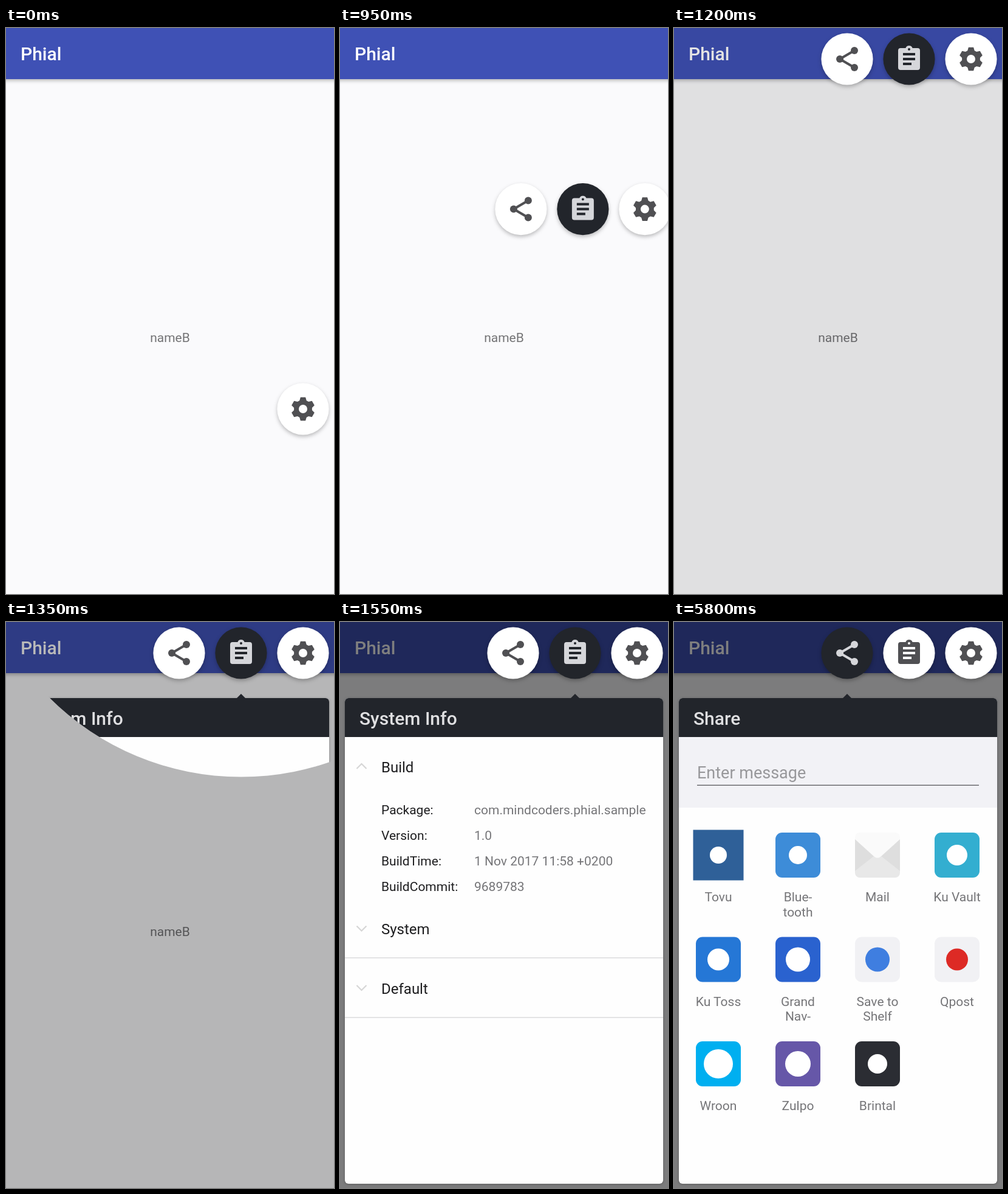
An HTML page that plays this animation: 540 px wide and 930 px high, repeating every 8 s.

```html
<!DOCTYPE html>
<html lang="en">
<head>
<meta charset="utf-8">
<title>Phial</title>
<style>
  html, body { margin: 0; width: 100%; height: 100%; overflow: hidden; background: #fafafc; }
  svg { display: block; font-family: Roboto, sans-serif; }
  .bar { filter: drop-shadow(0 2px 3px rgba(0,0,0,.3)); }
  .disc { filter: drop-shadow(0 3px 3px rgba(0,0,0,.25)); }
  .panel { filter: drop-shadow(0 1px 2px rgba(0,0,0,.25)); }
</style>
</head>
<body>
<svg id="stage" width="540" height="930" viewBox="0 0 540 930"></svg>
<script>
const LOOP = 8000, STEP = 50;
const DARK = '#22252b', LIGHT = '#d5d6da', GREY = '#505053', MUTED = '#757578';
const SLOTS = [285, 387, 489], TOP = 51, HOME = 626;
const REVEAL_Y = -193, REVEAL_R = 1190;

const text = (x, y, size, fill, str, more = '') =>
  `<text x="${x}" y="${y}" font-size="${size}" fill="${fill}" ${more}>${str}</text>`;
const rect = (x, y, w, h, fill, r = 0) =>
  `<rect x="${x}" y="${y}" width="${w}" height="${h}" rx="${r}" fill="${fill}"/>`;
const circle = (x, y, r, fill) => `<circle cx="${x}" cy="${y}" r="${r}" fill="${fill}"/>`;

// Icons are drawn around 0,0 in 24-unit space
function gearPath() {
  const points = [];
  for (let k = 0; k < 6; k++)
    for (const [a, r] of [[-22.5, 7.5], [-12, 9.9], [12, 9.9], [22.5, 7.5]]) {
      const angle = (k * 60 + a) * Math.PI / 180;
      points.push((r * Math.sin(angle)).toFixed(2) + ' ' + (-r * Math.cos(angle)).toFixed(2));
    }
  const hole = 'M3.5 0A3.5 3.5 0 1 0 -3.5 0A3.5 3.5 0 1 0 3.5 0Z';
  return `<path fill="currentColor" fill-rule="evenodd" d="M${points.join('L')}Z${hole}"/>`;
}
const icons = [
  `<path d="M6 -7L-6 0L6 7" fill="none" stroke="currentColor" stroke-width="2"/>` +
    [[6, -7], [-6, 0], [6, 7]].map(([x, y]) => circle(x, y, 3, 'currentColor')).join(''),
  `<path fill="currentColor" fill-rule="evenodd" d="M7 -9H2.82a3 3 0 0 0-5.64 0H-7a2 2 0 0 0-2 2V7
    a2 2 0 0 0 2 2H7a2 2 0 0 0 2-2V-7a2 2 0 0 0-2-2zM0 -9a1 1 0 0 1 0 2a1 1 0 0 1 0-2z
    M2 5H-5V3H2zM5 1H-5V-1H5zM5 -3H-5V-5H5z"/>`,
  gearPath()
];
const button = i => `<g id="b${i}"><circle class="disc" r="42.6"/><g transform="scale(2)">${icons[i]}</g></g>`;

const panel = (id, tip, title, body) => `
  <clipPath id="${id}Clip"><circle id="${id}Hole" cx="${tip}" cy="${REVEAL_Y}"/></clipPath>
  <g id="${id}" clip-path="url(#${id}Clip)">
    <g class="panel">${rect(8, 125, 524, 798, '#fefefe', 6)}</g>
    <path d="M8 189V131a6 6 0 0 1 6-6H526a6 6 0 0 1 6 6V189Z" fill="${DARK}"/>
    <path id="${id}Tip" d="M${tip - 8} 126l8 -8l8 8z" fill="${DARK}"/>
    ${text(32, 168.5, 30, '#dfdfe1', title, 'font-weight="500"')}
    ${body}
  </g>`;

function infoBody() {
  const section = (y, name, dir) =>
    `<path d="M27.5 ${y - 1 + 4 * dir}l8 ${-8 * dir}l8 ${8 * dir}" fill="none" stroke="#d6d6d6" stroke-width="2.2"/>` +
    text(68, y + 8.5, 24, '#1e1e20', name);
  const rows = [
    ['Package:', 'com.mindcoders.phial.sample'], ['Version:', '1.0'],
    ['BuildTime:', '1 Nov 2017 11:58 +0200'], ['BuildCommit:', '9689783']
  ].map(([key, value], i) =>
    text(68, 316 + i * 42, 21, '#1e1e20', key) + text(221, 316 + i * 42, 21, MUTED, value));
  return section(238, 'Build', 1) + rows.join('') +
    section(504.5, 'System', -1) + section(602, 'Default', -1) +
    rect(8, 551, 524, 1.5, '#dcdcde') + rect(8, 649, 524, 1.5, '#dcdcde');
}

function shareBody() {
  // tile colour, inner disc colour, disc radius, label lines
  const apps = [
    ['#2f6098', '#fff', 14, 'Tovu'],
    ['#3d8cd8', '#fff', 15, 'Blue-', 'tooth'],
    ['#dedede', '', 0, 'Mail'],
    ['#33aed0', '#fff', 17, 'Ku Vault'],
    ['#2577d6', '#fff', 18, 'Ku Toss'],
    ['#2a62cf', '#fff', 20, 'Grand', 'Nav-'],
    ['#f1f1f4', '#3f7ee0', 20, 'Save to', 'Shelf'],
    ['#f1f1f4', '#dd2a25', 18, 'Qpost'],
    ['#00aff0', '#fff', 24, 'Wroon'],
    ['#6657a8', '#fff', 21, 'Zulpo'],
    ['#2b2d33', '#fff', 16, 'Brintal']
  ];
  const envelope = `<path d="M298 409L335 380L372 409V412a8 8 0 0 1-8 8H306a8 8 0 0 1-8-8z" fill="#e8e8e8"/>
    <path d="M298 354a8 8 0 0 1 8-8H364a8 8 0 0 1 8 8V357L341 385q-6 5-12 0L298 357z" fill="#fafafa"/>`;
  return rect(8, 189, 524, 116, '#f2f2f6') +
    text(38, 257, 27, '#98989b', 'Enter message') + rect(38, 267.5, 464, 1.5, '#6c6c70') +
    apps.map(([tile, mark, r, ...lines], i) => {
      const x = 73 + i % 4 * 131, y = 383 + Math.floor(i / 4) * 171.5;
      const half = i ? 37 : 41.5;
      return rect(x - half, y - half, half * 2, half * 2, tile, i ? 11 : 0) +
        (r ? circle(x, y, r, mark) : envelope) +
        lines.map((s, n) => text(x, y + 76 + n * 24.5, 21, MUTED, s, 'text-anchor="middle"')).join('');
    }).join('');
}

const stage = document.getElementById('stage');
stage.innerHTML =
  rect(0, 0, 540, 930, '#fafafc') +
  `<g class="bar">${rect(-10, -10, 560, 94, '#3f51b5')}</g>` +
  text(24, 53, 30, '#fff', 'Phial', 'font-weight="500"') +
  text(270, 516, 21, '#747476', 'nameB', 'text-anchor="middle"') +
  `<rect id="dim" width="540" height="930"/>` +
  panel('info', SLOTS[1], 'System Info', infoBody()) +
  panel('share', SLOTS[0], 'Share', shareBody()) +
  [0, 1, 2].map(button).join('');

const el = id => document.getElementById(id);
const span = (t, from, length) => Math.min(1, Math.max(0, (t - from) / length));
const ease = p => (1 - Math.cos(p * Math.PI)) / 2;
const show = (id, on) => el(id).setAttribute('visibility', on ? 'visible' : 'hidden');

function draw(t) {
  const spread = ease(span(t, 500, 150)), rise = ease(span(t, 650, 550));
  const sharing = t >= 5650, active = sharing ? 0 : 1;
  const y = HOME + (TOP - HOME) * rise;
  const drift = 30 * spread * (1 - rise);

  SLOTS.forEach((slot, i) => {
    const x = SLOTS[2] + (slot - SLOTS[2]) * spread + drift;
    const b = el('b' + i);
    b.setAttribute('transform', `translate(${x} ${y})`);
    b.setAttribute('fill', i === active ? DARK : '#fff');
    b.setAttribute('color', i === active ? LIGHT : GREY);
    show('b' + i, i === 2 || spread > 0);
  });

  el('dim').setAttribute('opacity', 0.5 * span(t, 1105, 445));
  el('infoHole').setAttribute('r', REVEAL_R * ease(span(t, 1205, 345)));
  el('shareHole').setAttribute('r', REVEAL_R * ease(span(t, 5500, 300)));
  show('info', t >= 1250 && t < 5800);
  show('infoTip', t >= 1250 && !sharing);
  show('share', sharing);
}

const start = performance.now();
function tick() {
  const t = (performance.now() - start) % LOOP;
  draw(Math.floor(t / STEP) * STEP);
  requestAnimationFrame(tick);
}
tick();
</script>
</body>
</html>
```
